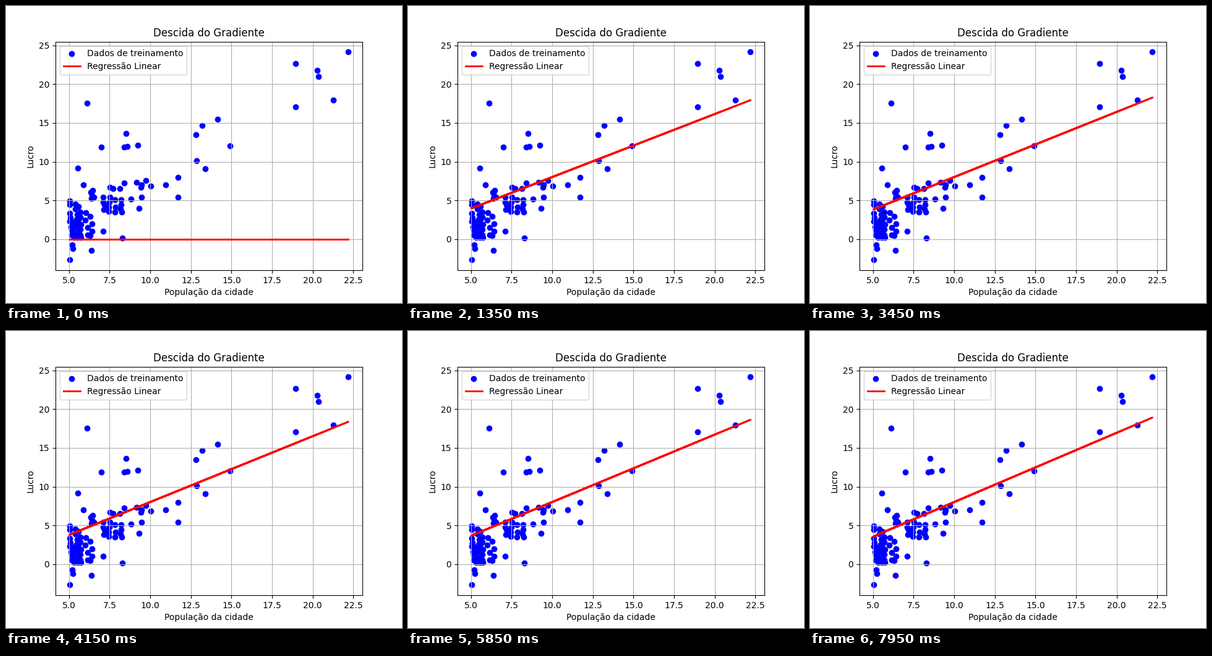
Animation, 640 px wide and 480 px high, one loop 8000 ms. Source, as a matplotlib script:

```python
import numpy as np
import matplotlib.pyplot as plt
from matplotlib.animation import FuncAnimation

FRAMES = 160
INTERVAL = 50
RATE = 0.01

# Least-squares fit and moments of the population: all that the descent needs.
BEST = np.array([-3.8958, 1.1930])
MEAN, VAR = 8.1598, 14.8216
HESSIAN = np.array([[1, MEAN], [MEAN, MEAN ** 2 + VAR]])


def cloud(n, x0, x1, y0, y1):
    """Spread n points evenly but irregularly over a box."""
    i = np.arange(1, n + 1)
    u, v = (0.5 + i * 0.7549) % 1, (0.5 + i * 0.5698) % 1
    return np.column_stack([x0 + (x1 - x0) * u, y0 + (y1 - y0) * v])


def make_cities():
    """Lone cities one by one, crowded areas as clouds."""
    lone = [
        (5.0269, -2.6807), (22.203, 24.147), (21.28, 17.93), (20.34, 20.99),
        (20.27, 21.77), (18.96, 17.05), (18.945, 22.64), (14.91, 12.05),
        (14.16, 15.5), (13.39, 9.06), (13.18, 14.69), (12.84, 10.12),
        (12.83, 13.5), (11.7, 8.0), (11.7, 5.39), (10.96, 7.05),
        (9.45, 5.41), (9.31, 3.96), (9.25, 12.13), (8.83, 5.17),
        (8.58, 12), (8.52, 13.66), (8.38, 11.89), (8.41, 7.23),
        (8.29, 0.14), (7.09, 1.05), (7.0, 11.85), (6.11, 17.59),
        (6.36, -1.42), (5.87, 7.0), (5.53, 9.13), (5.25, -1.22), (5.18, -0.74),
    ]
    crowds = [
        cloud(5, 5.03, 5.09, 2.0, 5.8),
        cloud(18, 5.12, 5.87, 0.1, 2.4),
        cloud(8, 5.38, 5.78, 2.4, 4.7),
        cloud(8, 6.0, 6.55, 0.3, 3.7),
        cloud(5, 6.33, 6.59, 5.15, 6.6),
        cloud(15, 7.07, 8.5, 3.4, 5.6),
        cloud(3, 7.5, 8.3, 6.5, 6.8),
        cloud(5, 9.15, 10.3, 6.6, 7.8),
    ]
    cities = np.vstack([lone, *crowds])
    return np.random.default_rng(1).permutation(cities)


def descend(steps):
    """Return (intercept, slope) before every gradient step."""
    theta = np.zeros(2)
    path = []
    for _ in range(steps):
        path.append(theta)
        theta = theta - RATE * HESSIAN @ (theta - BEST)
    return path


population, profit = make_cities().T
path = descend(FRAMES)

fig, ax = plt.subplots(figsize=(6.4, 4.8), dpi=100)
ax.scatter(population, profit, color="blue", label="Dados de treinamento")
line, = ax.plot(population, np.zeros_like(population), color="red", lw=2,
                label="Regressão Linear")
ax.set_title("Descida do Gradiente")
ax.set_xlabel("População da cidade")
ax.set_ylabel("Lucro")
ax.grid(True)
ax.legend(loc="upper left")


def update(i):
    a, b = path[i]
    line.set_ydata(a + b * population)
    return line,


anim = FuncAnimation(fig, update, frames=FRAMES, init_func=lambda: update(0),
                     interval=INTERVAL, repeat=True, repeat_delay=0)
plt.show()
```
